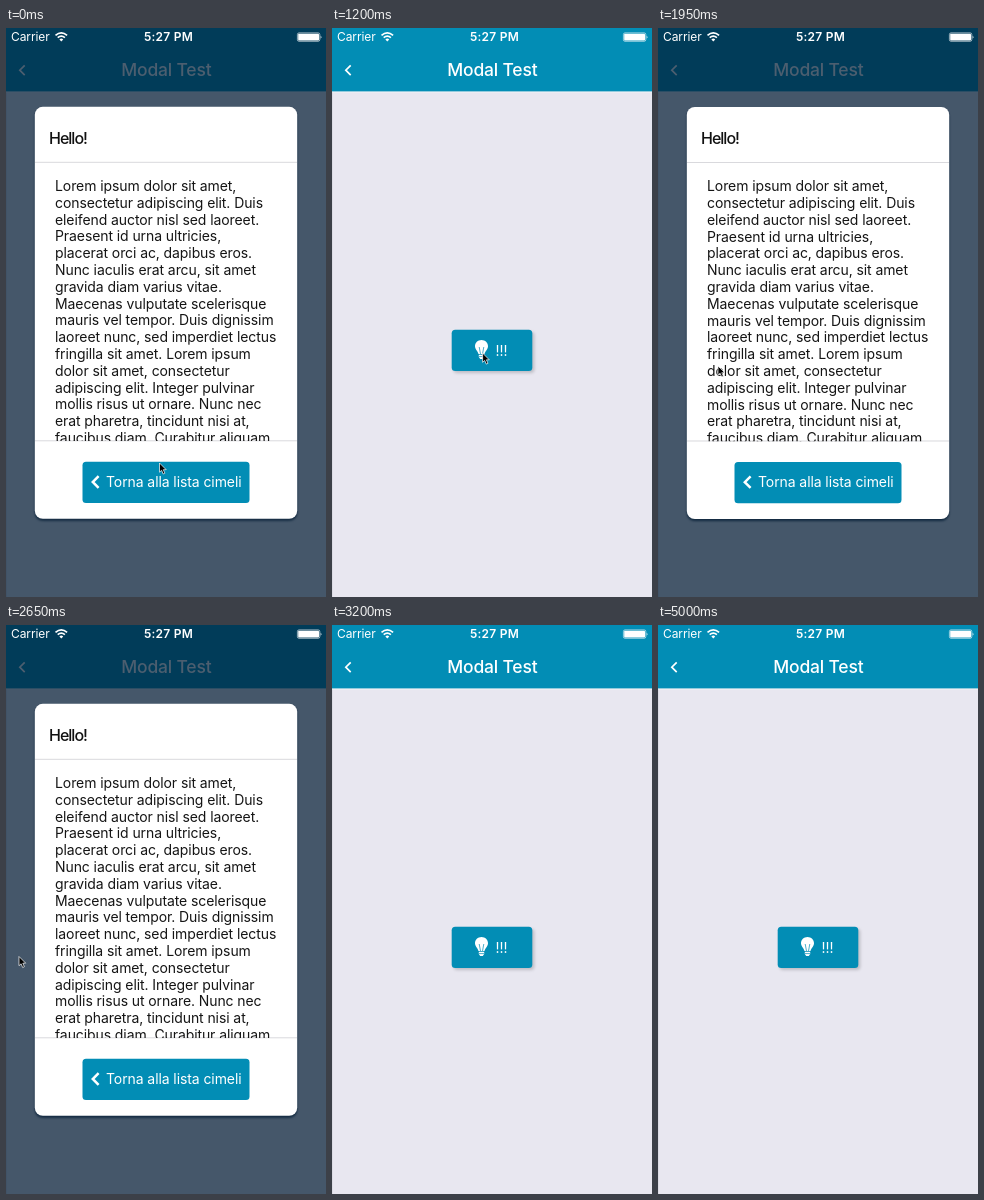
Animation of 320x569 px, one loop 5050 ms. Source, as an HTML page:

```html
<!DOCTYPE html>
<html lang="it">
<head>
<meta charset="utf-8">
<title>Modal Test</title>
<style>
  html, body { margin: 0; width: 100%; height: 100%; overflow: hidden; }
  svg { display: block; width: 100vw; height: 100vh; }
  text { font: 14px Inter, "Open Sans", sans-serif; letter-spacing: -.09px; fill: #fff; }
  .status { font-size: 12px; letter-spacing: -.1px; }
  .clock { font-weight: 600; letter-spacing: .25px; }
  .title { font-size: 17.5px; font-weight: 500; letter-spacing: -.2px; }
  .hello { font-size: 16px; font-weight: 500; letter-spacing: -1px; fill: #111; }
  .body text { fill: #151515; }
  .line { fill: none; stroke: #fff; }
  #modal { filter: drop-shadow(0 2px 1.2px rgba(0, 25, 50, .75)); }
  .raised { filter: drop-shadow(2px 2px 1.5px rgba(0, 0, 0, .18)); }
</style>
</head>
<body>
<svg viewBox="0 0 320 569" preserveAspectRatio="none">
  <defs><clipPath id="bodyClip"><rect x="29" y="135" width="262" height="278"/></clipPath></defs>

  <rect width="320" height="569" fill="#e8e7f0"/>
  <rect y="63" width="1" height="506" fill="#dcdce5"/>
  <rect y="63" width="320" height="1.4" fill="#f2f4f8"/>
  <rect width="320" height="63.4" fill="#028db5"/>
  <path class="line" d="M18.7 37.3 L13.8 42.2 L18.7 47.1" stroke-width="1.7"/>
  <text class="title" x="160.4" y="47.5" text-anchor="middle">Modal Test</text>

  <g id="openButton">
    <rect class="raised" x="119.7" y="301.8" width="80.6" height="41.2" rx="3.5" fill="#028db5"/>
    <path d="M149.5 312 C145.8 312 143 314.8 143 318.2 C143 321.4 145.8 322.8 146.5 326 H152.5 C153.2 322.8 156 321.4 156 318.2 C156 314.8 153.2 312 149.5 312 Z M146.8 326.8 H152.2 V329 L150.8 331 H148.2 L146.8 329 Z" fill="#fff"/>
    <path class="line" d="M147.2 319 L148.5 326 M151.8 319 L150.5 326 M147 328.6 H152" style="stroke:#028db5" stroke-width=".7"/>
    <text x="163.6" y="327.5" font-weight="500">!!!</text>
  </g>

  <rect id="backdrop" width="320" height="569" fill="#001a33"/>

  <g id="modal">
    <rect x="28.8" y="78.8" width="262.4" height="412" rx="8" fill="#fff"/>
    <text class="hello" x="43" y="116.3">Hello!</text>
    <path d="M29 134.3 H291 M29 412.8 H291" stroke="#d9d9dd"/>
    <g class="body" id="body" clip-path="url(#bodyClip)"></g>
    <g id="closeButton">
      <rect x="76.5" y="433.8" width="167" height="41.2" rx="3.5" fill="#028db5"/>
      <path class="line" d="M92.6 448.2 L86.8 454 L92.6 459.8" stroke-width="2.5"/>
      <text x="100" y="459.3">Torna alla lista cimeli</text>
    </g>
  </g>

  <text class="status" x="5" y="13.4">Carrier</text>
  <g class="line" stroke-width="1.7">
    <path d="M49.5 7.4 Q55.3 2.4 61.1 7.4 M51.7 9.7 Q55.3 6.7 58.9 9.7"/>
    <path d="M55.3 13.4 L53.4 11.4 Q55.3 9.8 57.2 11.4 Z" fill="#fff" stroke="none"/>
  </g>
  <text class="status clock" x="162.5" y="13.4" text-anchor="middle">5:27 PM</text>
  <rect class="line" x="291.4" y="4.9" width="22.4" height="8.4" rx="1.6" stroke-width=".6"/>
  <rect x="292.2" y="5.7" width="20.8" height="6.8" rx=".8" fill="#fff"/>
  <path d="M314.7 7.4 Q316.4 9.1 314.7 10.8 Z" fill="#fff"/>

  <path id="cursor" d="M0 0 V9.2 L2.1 7.3 L3.7 11 L5.4 10.2 L3.8 6.7 H6.7 Z" fill="#000" stroke="#fff" stroke-width=".7"/>
</svg>
<script>
const LOOP = 5050, HEIGHT = 569, SLIDE = 490, FADE = 286;
const FIRST_CLOSE = 438, REOPEN = 1473, SECOND_CLOSE = 2673;
const byId = id => document.getElementById(id);
const clamp = x => Math.min(1, Math.max(0, x));

const lines = `Lorem ipsum dolor sit amet,
consectetur adipiscing elit. Duis
eleifend auctor nisl sed laoreet.
Praesent id urna ultricies,
placerat orci ac, dapibus eros.
Nunc iaculis erat arcu, sit amet
gravida diam varius vitae.
Maecenas vulputate scelerisque
mauris vel tempor. Duis dignissim
laoreet nunc, sed imperdiet lectus
fringilla sit amet. Lorem ipsum
dolor sit amet, consectetur
adipiscing elit. Integer pulvinar
mollis risus ut ornare. Nunc nec
erat pharetra, tincidunt nisi at,
faucibus diam. Curabitur aliquam`.split("\n");
byId("body").innerHTML = lines
  .map((line, i) => `<text x="49" y="${163 + i * 16.8}">${line}</text>`).join("");

// cubic-bezier(.25, .1, .25, 1)
function ease(x) {
  if (x <= 0 || x >= 1) return clamp(x);
  const bezier = (a, b, s) => 3 * a * s * (1 - s) ** 2 + 3 * b * s * s * (1 - s) + s ** 3;
  let low = 0, high = 1;
  for (let i = 0; i < 24; i++) {
    const mid = (low + high) / 2;
    if (bezier(.25, .25, mid) < x) low = mid; else high = mid;
  }
  return bezier(.1, 1, low);
}
const easeInOut = x => x < .5 ? 2 * x * x : 1 - 2 * (1 - x) ** 2;

// How far the modal is open: 1 shown, 0 hidden.
function openness(t, duration) {
  const progress = start => ease((t - start) / duration);
  if (t < REOPEN) return 1 - progress(FIRST_CLOSE);
  if (t < SECOND_CLOSE) return progress(REOPEN);
  return 1 - progress(SECOND_CLOSE);
}

// A pressed button dims to 20% and recovers on release.
function pressOpacity(t, release) {
  return t < release
    ? 1 - .8 * easeInOut(clamp((t - release + 150) / 150))
    : .2 + .8 * easeInOut(clamp((t - release) / 250));
}

const cursorPath = [
  [0, 153.5, 435], [250, 155, 457], [600, 155.5, 459], [750, 155.5, 459],
  [1250, 150.5, 322.5], [1600, 150.5, 322.5], [1950, 60, 338],
  [2400, 13, 331.5], [2850, 13, 331.5], [3050, -12, 328]
];
function cursorAt(t) {
  const next = cursorPath.findIndex(p => p[0] > t);
  if (next < 0) return [-20, 328];
  const [t0, x0, y0] = cursorPath[next - 1], [t1, x1, y1] = cursorPath[next];
  const k = easeInOut((t - t0) / (t1 - t0));
  return [x0 + (x1 - x0) * k, y0 + (y1 - y0) * k];
}

function draw(now) {
  const t = now % LOOP;
  const shift = HEIGHT * (1 - openness(t, SLIDE));
  byId("modal").setAttribute("transform", `translate(0 ${shift})`);
  byId("backdrop").setAttribute("opacity", .7 * openness(t, FADE));
  byId("openButton").setAttribute("opacity", pressOpacity(t, REOPEN));
  byId("closeButton").setAttribute("opacity", pressOpacity(t, FIRST_CLOSE));
  byId("cursor").setAttribute("transform", `translate(${cursorAt(t)})`);
}

const start = performance.now();
function tick() {
  draw(performance.now() - start);
  requestAnimationFrame(tick);
}
tick();
</script>
</body>
</html>
```
